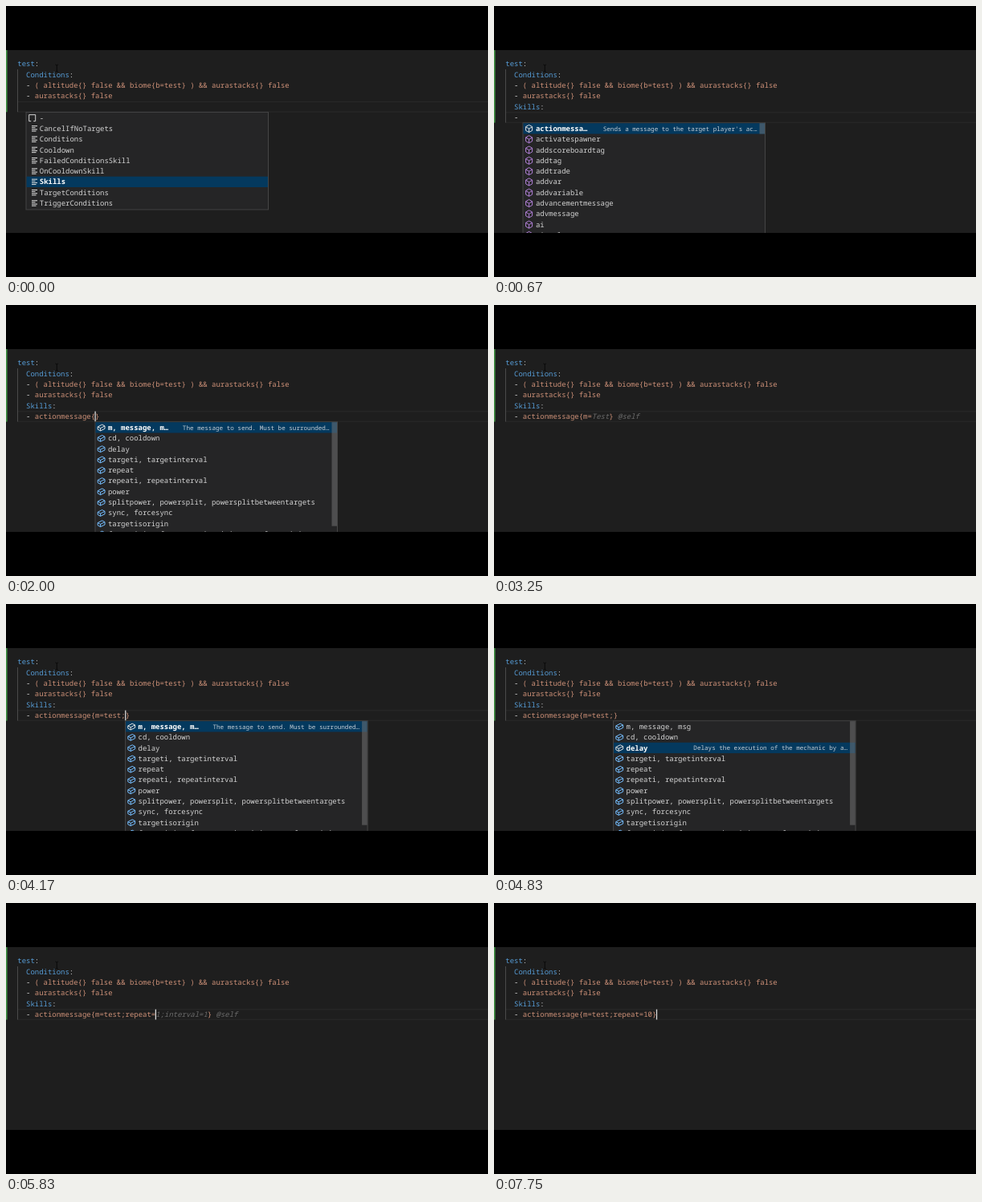
An HTML page with a canvas for the animation above (8 s loop, 600x338 px).

```html
<!DOCTYPE html>
<html lang="en">
<head>
<meta charset="utf-8">
<title>Editor completion</title>
<style>
html, body { margin: 0; width: 100%; height: 100%; overflow: hidden; background: #000; }
canvas { display: block; width: 600px; height: 338px; }
</style>
</head>
<body>
<canvas id="stage"></canvas>
<script>
const canvas = document.getElementById('stage');
const dpr = window.devicePixelRatio || 1;
canvas.width = 600 * dpr;
canvas.height = 338 * dpr;
const ctx = canvas.getContext('2d');

const LOOP = 8000;
const FAMILY = '"Noto Sans Mono", "DejaVu Sans Mono", monospace';
const SIZE = 8.96, CHAR = 5.376, LEFT = 14.3, PITCH = 13.33;
const BLUE = '#569cd6', ORANGE = '#ce9178', WHITE = '#d4d4d4', GHOST = '#6b6b6b';

const KEYS = ['-', 'CancelIfNoTargets', 'Conditions', 'Cooldown', 'FailedConditionsSkill',
  'OnCooldownSkill', 'Skills', 'TargetConditions', 'TriggerConditions'];
const MECHANICS = ['actionmessage', 'activatespawner', 'addscoreboardtag', 'addtag', 'addtrade',
  'addvar', 'addvariable', 'advancementmessage', 'advmessage', 'ai', 'aigoal'];
const ATTRIBUTES = ['m, message, msg', 'cd, cooldown', 'delay', 'targeti, targetinterval', 'repeat',
  'repeati, repeatinterval', 'power', 'splitpower, powersplit, powersplitbetweentargets',
  'sync, forcesync', 'targetisorigin', 'fromorigin, fo, sourceisorigin, castfromorigin'];

// Label and description of a focused row
const FOCUS = {
  actionmessage: ['actionmessa…', "Sends a message to the target player's ac…"],
  'm, message, msg': ['m, message, m…', 'The message to send. Must be surrounded…'],
  'cd, cooldown': ['cd, cooldown', 'The cooldown of the mechanic in seconds…'],
  delay: ['delay', 'Delays the execution of the mechanic by a…'],
  'targeti, targetinterval': ['targeti, ta…', 'The interval between each of the targets…'],
  repeat: ['repeat', 'How many times the mechanic is repeated…']
};

// [time, text before the caret, text after it, ghost parts around the closing brace]
const EDITS = [
  [0, null],
  [170, '- ', ''],
  [1670, '- actionmessage{', '}'],
  [2420, '- actionmessage{m=', '}'],
  [2830, '- actionmessage{m=', '}', 'Test', ' @self'],
  [3420, '- actionmessage{m=t', '}'],
  [3500, '- actionmessage{m=te', '}'],
  [3580, '- actionmessage{m=tes', '}'],
  [3670, '- actionmessage{m=test', '}'],
  [3920, '- actionmessage{m=test;', '}'],
  [5170, '- actionmessage{m=test;repeat=', '}'],
  [5830, '- actionmessage{m=test;repeat=', '}', '1;interval=1', ' @self'],
  [6920, '- actionmessage{m=test;repeat=1', '}'],
  [7500, '- actionmessage{m=test;repeat=10', '}'],
  [7670, '- actionmessage{m=test;repeat=10}', '']
];

// [start, end, left, kind]
const POPUPS = [
  [0, 170, 25, 'key'],
  [330, 1670, 36, 'mechanic'],
  [1830, 2420, 111, 'attribute'],
  [4080, 5170, 148.6, 'attribute']
];
const LISTS = { key: KEYS, mechanic: MECHANICS, attribute: ATTRIBUTES };
const MOVES = [4670, 4830, 4920, 5000];
const CARET_TOGGLES = [170, 580, 1080, 1580, 1670, 2170, 2420, 2920, 3420, 4420, 4830, 4920, 5170];
const CARET_HIDDEN = [[0, 170], [580, 1080], [1580, 1670], [2170, 2420], [2920, 3420],
  [4420, 4920], [6330, 6830]];

const within = (t, [a, b]) => t >= a && t < b;

function rect(x, y, w, h, color) {
  ctx.fillStyle = color;
  ctx.fillRect(x, y, w, h);
}

function text(str, x, y, color, style = '', size = SIZE) {
  ctx.font = `${style} ${size}px ${FAMILY}`;
  ctx.fillStyle = color;
  ctx.fillText(str, x, y);
}

// Draws coloured pieces one after another on a line
function code(line, col, ...pieces) {
  for (const [str, color, style] of pieces) {
    text(str, LEFT + col * CHAR, 75.4 + line * PITCH, color, style);
    col += str.length;
  }
  return col;
}

function path(points, color) {
  ctx.beginPath();
  points.forEach(([x, y], i) => i ? ctx.lineTo(x, y) : ctx.moveTo(x, y));
  ctx.strokeStyle = color;
  ctx.stroke();
}

function icon(kind, x, y, color) {
  ctx.lineWidth = 1;
  if (kind === 'mechanic') {
    path([[x, y - 4.6], [x + 4, y - 2.4], [x + 4, y + 2.4], [x, y + 4.6],
      [x - 4, y + 2.4], [x - 4, y - 2.4], [x, y - 4.6]], color);
    path([[x - 4, y - 2.2], [x, y], [x + 4, y - 2.2]], color);
    path([[x, y], [x, y + 4.4]], color);
  } else if (kind === 'attribute') {
    path([[x - 4.4, y - 1], [x + 1, y - 3.8], [x + 4.4, y - 2], [x + 4.4, y + 1.4],
      [x - 1, y + 4], [x - 4.4, y + 2.2], [x - 4.4, y - 1], [x - 1, y + 0.7], [x + 4.4, y - 2]], color);
    path([[x - 1, y + 0.7], [x - 1, y + 4]], color);
  } else {
    [[-3.3, 7], [-1.2, 4.5], [1, 7], [3.1, 5.5]].forEach(([dy, w]) => rect(x - 3.5, y + dy - 0.5, w, 1, color));
  }
}

function snippetIcon(x, y) {
  ctx.lineWidth = 1;
  path([[x - 1.5, y + 4], [x - 4, y + 4], [x - 4, y - 4], [x + 4, y - 4], [x + 4, y + 4], [x + 1.5, y + 4]], WHITE);
}

function popup(left, kind, focus) {
  const rows = LISTS[kind];
  const top = kind === 'key' ? 132.6 : 145.9;
  const width = 301.5, height = kind === 'key' ? 121.4 : 150;
  rect(left - 0.5, top - 0.6, width + 1, height + 1, '#454545');
  rect(left + 0.5, top + 0.3, width - 1, height - 0.8, '#252526');

  rows.forEach((label, i) => {
    const y = top + 0.3 + i * 13.3, mid = y + 6.75, on = i === focus;
    if (on) rect(left + 0.5, y, width - 1, 13.3, '#04395e');
    const tint = on || kind === 'key' ? '#e0e0e0' : kind === 'mechanic' ? '#b180d7' : '#75beff';
    if (label === '-') snippetIcon(left + 7.7, mid);
    else icon(kind, kind === 'key' ? left + 10.5 : left + 7.6, mid, tint);

    const [short, about] = on && FOCUS[label] || [label];
    text(short, left + (kind === 'key' ? 16.8 : 16), mid + 3, on ? '#fff' : WHITE, on ? '600' : '');
    if (about) {
      ctx.textAlign = 'right';
      text(about, left + 291.5, mid + 2.6, '#c3ccd4', '', 7.62);
      ctx.textAlign = 'left';
    }
  });

  if (kind !== 'key') {
    rect(left + 294.5, top + 0.3, 6.5, kind === 'mechanic' ? 13.3 : 129.5, 'rgba(121,121,121,.5)');
  }
}

function pointer() {
  ctx.lineWidth = 1;
  path([[61.5, 73], [63.3, 74], [65, 73]], '#090909');
  path([[63.3, 74], [63.3, 81.5]], '#090909');
  path([[61.5, 82.3], [63.3, 81.5], [65, 82.3]], '#090909');
}

function draw(t) {
  ctx.setTransform(dpr, 0, 0, dpr, 0, 0);
  rect(0, 0, 600, 338, '#000');
  ctx.save();
  ctx.beginPath();
  ctx.rect(0, 55, 600, 228);
  ctx.clip();
  rect(0, 55, 600, 228, '#1e1e1e');

  const [, before, after, ghost, tail] = EDITS.filter(e => e[0] <= t).pop();
  const typed = before !== null;
  const row = typed ? 5 : 4;
  const rowTop = 65.6 + row * PITCH, bottom = rowTop + PITCH;

  rect(15, rowTop, 585, 1, '#2a2a2a');
  rect(15, bottom - 0.8, 585, 1, '#2a2a2a');
  rect(0, 55, 1.6, bottom - 55, '#3f9142');
  rect(14, 79, 1, bottom - 79, '#4a4a4a');

  code(0, 0, ['test', BLUE], [':', WHITE]);
  code(1, 2, ['Conditions', BLUE], [':', WHITE]);
  code(2, 2, ['- ', WHITE], ['( altitude{} false && biome{b=test} ) && aurastacks{} false', ORANGE]);
  code(3, 2, ['- ', WHITE], ['aurastacks{} false', ORANGE]);

  if (typed) {
    code(4, 2, ['Skills', BLUE], [':', WHITE]);
    const caret = code(5, 2, ['- ', WHITE], [before.slice(2), ORANGE]);
    code(5, caret, [ghost || '', GHOST, 'italic'], [after, ORANGE], [tail || '', GHOST, 'italic']);
    if (!CARET_HIDDEN.some(span => within(t, span))) {
      rect(LEFT + caret * CHAR - 0.6, rowTop + 0.4, 1.3, 12.8, '#d8d8d8');
    }
  }

  const open = POPUPS.find(span => within(t, span));
  if (open) {
    const focus = open[3] === 'key' ? 6 : MOVES.filter(m => m <= t).length;
    popup(open[2], open[3], focus);
  }
  pointer();
  ctx.restore();
}

ctx.textBaseline = 'alphabetic';
ctx.textRendering = 'geometricPrecision';
const start = performance.now();
function frame() {
  draw((performance.now() - start) % LOOP);
  requestAnimationFrame(frame);
}
frame();
</script>
</body>
</html>
```
